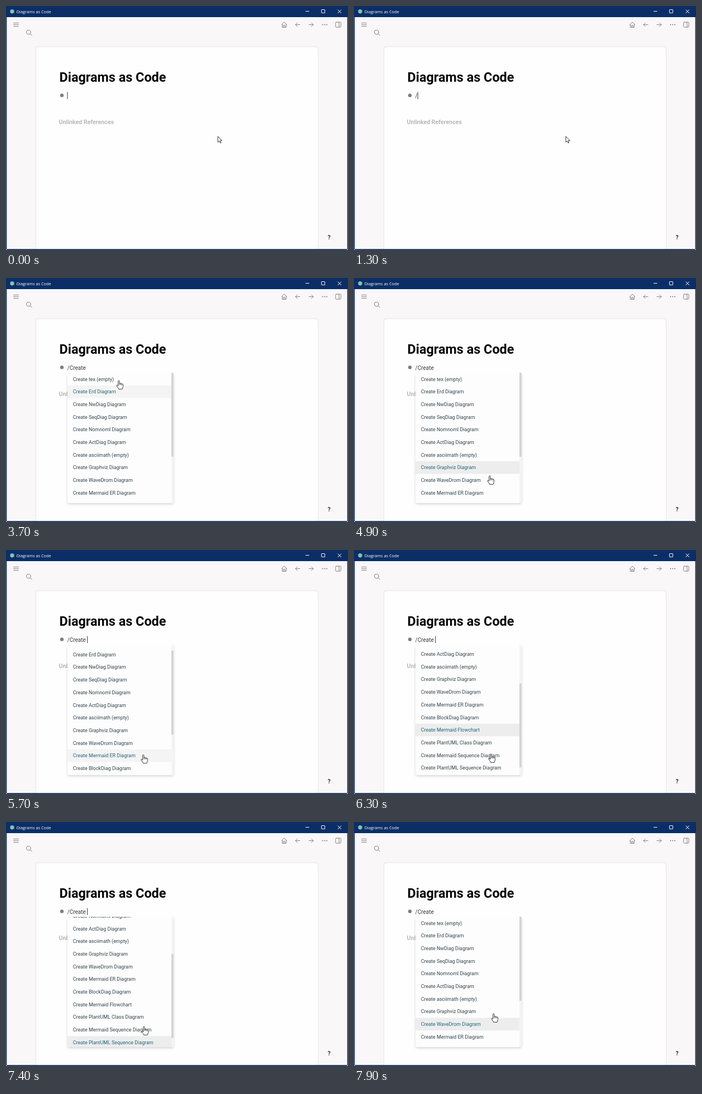
An HTML page that plays this animation: 612 by 438 pixels, repeating every 8 s.

```html
<!DOCTYPE html>
<html lang="en">
<head>
<meta charset="utf-8">
<title>Diagrams as Code</title>
<style>
  html, body { margin: 0; width: 100%; height: 100%; overflow: hidden; background: #f9f7f7; }
  svg { display: block; width: 612px; height: 438px; }
  text { font-family: Roboto, "Open Sans", sans-serif; white-space: pre; }
  .icon { fill: none; stroke: #858383; stroke-width: 1; stroke-linecap: round; stroke-linejoin: round; }
  .win { fill: none; stroke: #fff; stroke-width: 1; }
  .item { font-size: 8.93px; fill: #33454c; }
  .item.on { fill: #24667a; }
  .head { font-size: 7.4px; fill: #74777a; }
</style>
</head>
<body>
<svg viewBox="0 0 612 438">
  <defs>
    <clipPath id="menuClip"><path d="M110 170H300V400a4 4 0 0 1-4 4H114a4 4 0 0 1-4-4Z"/></clipPath>
    <filter id="shadow" x="-10%" y="-10%" width="120%" height="120%">
      <feDropShadow dx="0" dy="2" stdDeviation="2" flood-color="#000" flood-opacity=".16"/>
    </filter>
  </defs>

  <rect width="612" height="438" fill="#f9f7f7"/>
  <path d="M53.5 440V77a4 4 0 0 1 4-4H554.500a4 4 0 0 1 4 4V440Z" fill="#fefefe" stroke="#e6e4e4"/>

  <g class="icon">
    <path d="M13.500 30.500h9M13.500 33.500h9M13.500 36.500h9"/>
    <circle cx="40.300" cy="47" r="3.800"/><path d="M43.100 49.800l3.200 3.200"/>
    <path d="M493.300 33.500l4.700-4.600 4.700 4.600M494.500 32.500v5.800h7v-5.800M496.700 38.300v-3.600h2.600v3.600"/>
    <path d="M526 33.500h-8M521.500 30l-3.500 3.500 3.500 3.500"/>
    <path d="M542 33.500h8M546.500 30l3.500 3.500-3.500 3.500"/>
    <rect x="589.800" y="29" width="9.400" height="9" rx="1.200"/><path d="M596 29v9"/>
  </g>
  <g fill="#777575">
    <circle cx="566.500" cy="33.500" r="1"/><circle cx="570.300" cy="33.500" r="1"/><circle cx="574.100" cy="33.500" r="1"/>
  </g>

  <text x="95.500" y="136" font-size="23.400" font-weight="700" fill="#070707">Diagrams as Code</text>
  <text x="94.500" y="212.300" font-size="10.600" font-weight="700" fill="#b9b8b8">Unlinked References</text>
  <circle cx="100" cy="160.400" r="3.200" fill="#7f7e7e"/>
  <text x="575.700" y="419.200" font-size="10" font-weight="700" fill="#333">?</text>

  <g id="menu">
    <rect x="110" y="170" width="190" height="234" rx="4" fill="#fdfdfd" filter="url(#shadow)"/>
    <rect x="104" y="162" width="202" height="8" fill="#fefefe"/>
    <g clip-path="url(#menuClip)">
      <rect x="110" y="170" width="190" height="234" fill="#fdfdfd"/>
      <g id="list">
        <rect id="bar" x="110" width="186" height="22.700"/>
        <g id="rows"></g>
      </g>
      <rect x="296" y="170" width="4" height="234" fill="#f4f4f4"/>
      <rect id="thumb" x="296" width="3.600" fill="#d2d2d2"/>
    </g>
  </g>

  <text id="input" x="109.500" y="164.800" font-size="10" fill="#3a3a3a"></text>
  <rect id="caret" y="154.500" width="1" height="12.500" fill="#333"/>

  <g id="arrow"><path d="M0 0V10.600L2.500 8.300 4.200 12 5.900 11.200 4.300 7.700H7.500Z" fill="#fff" stroke="#222" stroke-width=".9" stroke-linejoin="round"/></g>
  <g id="hand"><path d="M-1.300 1.200C-1.300-.3 1-.3 1 1.200V5.200C1.600 4.400 3 4.600 3.200 5.600 3.900 4.900 5.200 5.200 5.400 6.200 6.300 5.700 7.500 6.200 7.500 7.400V10.600C7.500 12.600 6.300 13.400 6.100 15.400H-.3C-.5 13.500-2.800 11.700-4 9.500-4.500 8.300-3.100 7.600-2.300 8.600L-1.300 9.800ZM1 5.200V8M3.200 5.600V8.200M5.400 6.200V8.400" fill="#fff" stroke="#222" stroke-width=".9" stroke-linejoin="round"/></g>

  <g fill="#0b2e66">
    <rect width="612" height="20"/>
    <rect width="1.300" height="438"/>
    <rect x="610.700" width="1.300" height="438"/>
    <rect y="436.300" width="612" height="1.700"/>
  </g>
  <path d="M0 438v-3q0 3 3 3ZM612 438v-3q0 3-3 3Z" fill="#fff"/>
  <circle cx="11" cy="9.700" r="3.700" fill="#7cc6ac"/>
  <text x="18.700" y="12.600" font-size="7.400" fill="#fff" style="font-family:'Open Sans','Noto Sans',sans-serif">Diagrams as Code</text>
  <g class="win">
    <path d="M536 9.500h6.500M593.500 6.500l6.500 6.500M600 6.500l-6.500 6.500"/>
    <rect x="564.500" y="6.500" width="6" height="6" rx=".6"/>
  </g>
</svg>
<script>
const $ = id => document.getElementById(id);
const LOOP = 8000, STEP = 100, TOP = 170, ROW = 22.7, VIEW = 234;

const diagrams = ['tex (empty)', 'Erd Diagram', 'NwDiag Diagram', 'SeqDiag Diagram', 'Nomnoml Diagram',
  'ActDiag Diagram', 'asciimath (empty)', 'Graphviz Diagram', 'WaveDrom Diagram', 'Mermaid ER Diagram',
  'BlockDiag Diagram', 'Mermaid Flowchart', 'PlantUML Class Diagram', 'Mermaid Sequence Diagram',
  'PlantUML Sequence Diagram', 'PlantUML Use Case Diagram'];

// Headings start with '#'; size is the full row count behind the scrollbar.
const menus = {
  all: { size: 60, items: ['#BASIC', 'Page reference', 'Page embed', 'Block reference', 'Block embed', 'Link',
    'Image link', 'Underline', '#TIME & DATE', 'Tomorrow', 'Yesterday'] },
  c: { size: 29.3, items: ['C', 'Cards', 'Cloze', 'CANCELED', 'Scheduled', 'Block embed', 'Date picker',
    'Calculator', 'Current time', '#BASIC', 'Page embed'] },
  create: { size: 16, items: diagrams.map(name => 'Create ' + name) }
};

const typing = [[0, ''], [1300, '/'], [1700, '/C'], [2000, '/Cr'], [2100, '/Cre'], [2200, '/Crea'],
  [2400, '/Creat'], [2500, '/Create ']];
const shown = [[0, null], [1400, 'all'], [1800, 'c'], [2200, 'create']];
const pointer = [[0, 379, 234], [2900, 379, 234], [3200, 310, 250], [3350, 262, 236], [3500, 222, 216],
  [3700, 202, 184], [3800, 202, 182], [4000, 206, 195], [4700, 236, 334], [4900, 243, 355],
  [5300, 246, 368], [5500, 246, 368], [6300, 245, 366], [7000, 247, 367], [7400, 247, 367],
  [7750, 249, 353], [7900, 250, 344]];
const wheel = [[0, 0], [5400, 0], [5800, 22], [6150, 60], [6200, 68], [6300, 108], [6400, 131],
  [7300, 131], [7400, 103.5], [7700, 8], [7800, 0]];

const last = (track, t) => track.filter(key => key[0] <= t).pop()[1];

function tween(track, t, col = 1) {
  const i = track.findIndex(key => key[0] > t);
  if (i < 0) return track[track.length - 1][col];
  if (i === 0) return track[0][col];
  const a = track[i - 1], b = track[i];
  return a[col] + (b[col] - a[col]) * (t - a[0]) / (b[0] - a[0]);
}

const overMenu = (x, y) => x < 296 && y > TOP && y < TOP + VIEW;

// Row under the pointer, or -1 when it is outside the menu.
function hovered(t) {
  const x = tween(pointer, t), y = tween(pointer, t, 2);
  return overMenu(x, y) ? Math.floor((y - TOP + tween(wheel, t)) / ROW) : -1;
}

function caretOn(t) {
  if (t < 1300) return t < 200 || t >= 800;
  if (t < 3000) return true;
  const phase = t % 1060;
  return phase < 470 || phase >= 1000;
}

let current;
function fill(name) {
  if (name === current) return;
  current = name;
  $('rows').replaceChildren(...menus[name].items.map((item, i) => {
    const head = item[0] === '#';
    const el = document.createElementNS('http://www.w3.org/2000/svg', 'text');
    el.setAttribute('class', head ? 'head' : 'item');
    el.setAttribute('x', head ? 114.5 : 119.7);
    el.setAttribute('y', TOP + (i + .5) * ROW + (head ? 1.7 : 3.2));
    el.textContent = head ? item.slice(1) : item;
    return el;
  }));
}

function drawMenu(t) {
  const name = last(shown, t);
  $('menu').style.display = name ? '' : 'none';
  if (!name) return;
  fill(name);
  const scroll = tween(wheel, t), hover = hovered(t - 150);
  const first = name === 'all' ? 1 : 0;
  const row = hover < 0 ? first : hover;
  const settled = hover >= 0 && hovered(t - 200) === hover;
  $('list').setAttribute('transform', `translate(0 ${-scroll})`);
  $('bar').setAttribute('y', TOP + row * ROW);
  $('bar').setAttribute('fill', settled ? '#ededed' : '#f4f4f4');
  [...$('rows').children].forEach((el, i) => el.classList.toggle('on', i === hover));
  const ratio = VIEW / (menus[name].size * ROW);
  $('thumb').setAttribute('y', TOP + scroll * ratio);
  $('thumb').setAttribute('height', VIEW * ratio);
}

function drawPointer(t) {
  const x = tween(pointer, t), y = tween(pointer, t, 2), hand = overMenu(x, y);
  for (const id of ['arrow', 'hand']) {
    $(id).style.display = (id === 'hand') === hand ? '' : 'none';
    $(id).setAttribute('transform', `translate(${x} ${y})`);
  }
}

function draw(t) {
  const text = last(typing, t), input = $('input');
  input.textContent = text;
  $('caret').setAttribute('x', 109.5 + (text ? input.getComputedTextLength() : 0));
  $('caret').style.display = caretOn(t) ? '' : 'none';
  drawMenu(t);
  drawPointer(t);
}

const start = performance.now();
function tick() {
  const t = (performance.now() - start) % LOOP;
  draw(Math.floor(t / STEP) * STEP);
  requestAnimationFrame(tick);
}
tick();
</script>
</body>
</html>
```
